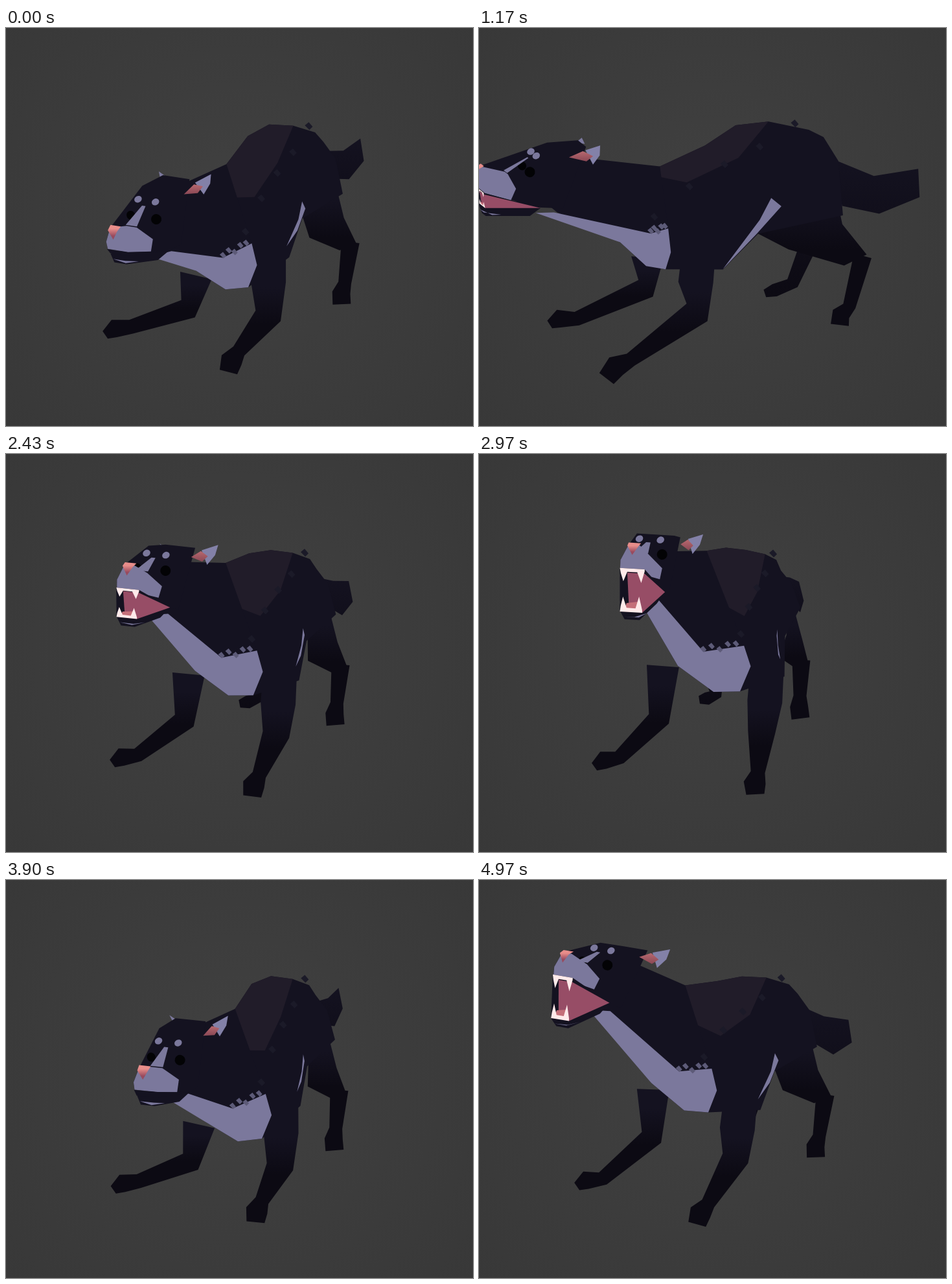
Animation, 721 px wide and 614 px high, one loop 5 s. Source, as an HTML page with a canvas:

```html
<!DOCTYPE html>
<html lang="en">
<head>
<meta charset="utf-8">
<title>Barking dog</title>
<style>
html, body { margin: 0; width: 100%; height: 100%; overflow: hidden; background: #3c3c3c }
canvas { display: block }
</style>
</head>
<body>
<canvas id="stage" width="721" height="614"></canvas>
<script>
const ctx = document.getElementById('stage').getContext('2d');
const LOOP = 5000, BARK = LOOP / 7.5, RAD = Math.PI / 180;
const COAT = '#141220', DARK = '#0c0a13', LILAC = '#7b789c', BLACK = '#030305';
const TILT = .2; // sine of the camera's downward angle

// Time and heading in degrees: 0 faces the camera, 90 is a left profile.
const turn = [[0, 38], [530, 49], [1170, 76], [1400, 76], [1930, 47], [2300, 32], [2900, 16], [3470, 20], [4370, 35], [LOOP, 40]];

// Body points: front view x, y; side view x, y; rise with a bark; half width of a limb.
const body = {
  torso: [
    [366, 200, 285, 232, 50], [384, 158, 350, 186, 12], [411, 148, 396, 150, 0], [442, 154, 447, 144, 0],
    [462, 163, 510, 157, 0], [470, 179, 533, 168, 0], [487, 200, 556, 205, 0], [500, 240, 563, 290, 0],
    [470, 283, 430, 318, 0], [466, 345, 375, 373, 0], [412, 406, 292, 387, 42], [374, 412, 263, 384, 48],
    [325, 385, 225, 352, 62]],
  tint: [[428, 212, 400, 200, 0], [412, 268, 322, 245, 20], [376, 272, 250, 240, 50]],
  tail: [
    [470, 185, 545, 200, -5], [480, 174, 609, 222, -20], [488, 156, 675, 202, -45],
    [495, 186, 677, 246, -45], [490, 214, 615, 275, -35], [478, 215, 560, 270, -15]],
  thigh: [
    [472, 282, 430, 318, 0], [464, 315, 478, 342, 0], [492, 332, 565, 367, 0],
    [514, 325, 600, 350, 0], [503, 288, 562, 303, 0], [485, 220, 540, 200, 0]],
  shank: [[503, 320, 594, 352, 0, 14], [500, 376, 573, 430, 0, 10], [498, 393, 560, 442, 0, 14], [500, 411, 558, 459, 0, 14]],
  foreleg: [
    [438, 340, 337, 350, 0, 26], [438, 390, 334, 395, 8, 27], [436, 444, 337, 444, 15, 21],
    [419, 492, 231, 512, 0, 11], [413, 508, 208, 522, 0, 17], [413, 526, 193, 541, 0, 14]],
  farFore: [
    [305, 385, 268, 375, 60, 25], [290, 442, 262, 414, 36, 17], [213, 467, 150, 448, 0, 11],
    [188, 471, 122, 448, 0, 14], [174, 481, 108, 457, 0, 7]],
  farHind: [[372, 352, 508, 342, 0, 13], [372, 372, 486, 394, 0, 10], [358, 379, 458, 405, 0, 10], [346, 381, 443, 410, 0, 6]],
  bib: [[364, 362, 272, 338, 60], [418, 336, 296, 324, 42], [428, 368, 300, 361, 42]],
  belly: [[460, 320, 375, 373, 0], [460, 295, 433, 296, 0], [460, 270, 451, 262, 0], [460, 280, 467, 275, 0], [460, 310, 428, 318, 0]]
};

// Head points, from between the eyes: forward, up, towards the near side.
const both = list => list.flatMap(([a, b, c]) => [[a, b, c], [a, b, -c]]);
const skull = both([[0, 22, 20], [-35, 40, 30], [-82, 50, 26], [-10, -10, 41], [-25, -52, 32], [-62, -50, 25], [72, -6, 9], [68, -30, 20], [64, -42, 20]]);
const nape = both([[-82, 24, 22], [-55, -58, 20]]);
const jaw = both([[62, -47, 16], [58, -61, 12], [-10, -66, 20], [-25, -53, 30]]);
const muzzle = [...both([[72, -6, 9], [68, -30, 20], [64, -42, 20], [30, -10, 10]]), [25, -46, 34], [20, -27, 34]];
const blaze = [[0, 18, -3], [32, -8, -10], [32, -8, 12], [0, 18, 4]];
const nose = [[70, -2, -10], [70, -2, 10], [78, -9, 9], [76, -23, 0], [78, -9, -9]];
const chin = [[61, -55, -12], [61, -55, 12], [35, -60, 18], [45, -63, 0]];
const ear = [[-78, 47, 40], [-95, 60, 58], [-98, 44, 54], [-92, 27, 46]];
const earPink = [[-55, 32, 36], [-74, 45, 41], [-90, 40, 46], [-82, 30, 42]];
const farEar = [[-80, 45, -30], [-92, 52, -42], [-95, 45, -30]];
const gumTop = [[66, -42, -20], [66, -42, 20]], gumLow = [[60, -47, -18], [60, -47, 18]];
const lipCorner = [-25, -53, 30];

const mix = (a, b, k) => a + (b - a) * k;

function heading(t) {
  const i = turn.findIndex(key => key[0] > t);
  const [a, b] = [turn[i - 1], turn[i]];
  return mix(a[1], b[1], (t - a[0]) / (b[0] - a[0]));
}

function poseAt(t) {
  const deg = heading(t), side = (deg - 20) / 57, yaw = deg * RAD;
  const phase = t / BARK % 1;
  const bark = Math.sin(Math.PI * phase) ** 2.8;
  const gape = 42 * RAD * Math.sin(Math.PI * (phase + .06)) ** 2;
  const pitch = 27 * RAD * bark;
  const eyes = [274 - 195 * side - 28 * bark, mix(292, 146 - 64 * side, bark)];
  const [sy, cy, sp, cp, sg, cg] = [yaw, pitch, gape].flatMap(v => [Math.sin(v), Math.cos(v)]);

  const place = ([xf, yf, xs, ys, rise, width]) =>
    [mix(xf, xs, side) - .4 * rise * bark, mix(yf, ys, side) - rise * bark, width];
  const head = ([a, b, c]) => {
    const fwd = a * cp - b * sp, up = a * sp + b * cp;
    return [eyes[0] - fwd * sy + c * cy, eyes[1] - up * .98 + (fwd * cy + c * sy) * TILT];
  };
  const open = ([a, b, c]) => {
    const [ha, hb] = lipCorner, da = a - ha, db = b - hb;
    return head([ha + da * cg + db * sg, hb - da * sg + db * cg, c]);
  };
  return { place, head, open };
}

// Convex outline of a set of points.
function hull(points) {
  const sorted = [...points].sort((p, q) => p[0] - q[0] || p[1] - q[1]);
  const chain = list => {
    const out = [];
    for (const p of list) {
      while (out.length > 1) {
        const [a, b] = out.slice(-2);
        if ((b[0] - a[0]) * (p[1] - a[1]) > (b[1] - a[1]) * (p[0] - a[0])) break;
        out.pop();
      }
      out.push(p);
    }
    return out.slice(0, -1);
  };
  return [...chain(sorted), ...chain(sorted.reverse())];
}

// Outline of a limb through joints with their half widths.
function limb(joints) {
  const left = [], right = [];
  joints.forEach(([x, y, w], i) => {
    const a = joints[Math.max(0, i - 1)], b = joints[Math.min(joints.length - 1, i + 1)];
    const dx = b[0] - a[0], dy = b[1] - a[1], n = w / Math.hypot(dx, dy);
    left.push([x - dy * n, y + dx * n]);
    right.unshift([x + dy * n, y - dx * n]);
  });
  return [...left, ...right];
}

function poly(points, top, bottom, from = 0, to = 1) {
  ctx.fillStyle = top;
  if (bottom) {
    const ys = points.map(p => p[1]);
    const shade = ctx.createLinearGradient(0, Math.min(...ys), 0, Math.max(...ys));
    shade.addColorStop(from, top);
    shade.addColorStop(to, bottom);
    ctx.fillStyle = shade;
  }
  ctx.beginPath();
  for (const [x, y] of points) ctx.lineTo(x, y);
  ctx.fill();
}

function spot([x, y], rx, ry, color) {
  ctx.beginPath();
  ctx.ellipse(x, y, rx, ry, -.5, 0, 7);
  ctx.fillStyle = color;
  ctx.fill();
}

const fleck = ([x, y], r, color) => poly([[x - r, y - 1], [x, y - r], [x + r, y + 1], [x + 1, y + r]], color);

// Points at a share of the way from a to b, plus a share of the mouth's opening.
const span = (a, b, gap, pairs) => pairs.map(([s, f]) => [0, 1].map(i => mix(a[i], b[i], s) + gap[i] * f));

function drawMouth(head, open) {
  const [u1, u2] = gumTop.map(head), [l1, l2] = gumLow.map(open), corner = head(lipCorner);
  poly([u1, u2, corner, l2, l1], COAT);
  const gap = [l1[0] - u1[0], l1[1] - u1[1]];
  if (gap[1] < 11) return;
  const fangs = [[0, 0], [.04, .12], [.14, .3], [.3, .08], [.7, .08], [.86, .32], [1, .05], [1, 0]];
  poly([...span(u1, u2, gap, [[.3, .1], [1, .1]]), corner, l2, ...span(l1, l2, gap, [[.4, -.2]])], '#974d66');
  poly(span(l1, l2, gap, [[.2, -.06], [.3, -.2], [.85, -.25], [.95, -.06]]), '#c46f79');
  poly(span(u1, u2, gap, fangs), '#ffeaea');
  poly(span(l1, l2, gap, fangs.map(([s, f]) => [s, -f * 1.15])), '#ffeaea');
}

const backdrop = ctx.createRadialGradient(360, 290, 40, 360, 300, 480);
backdrop.addColorStop(0, '#404040');
backdrop.addColorStop(1, '#383838');

function draw(t) {
  const { place, head, open } = poseAt(t);
  const p = {};
  for (const part in body) p[part] = body[part].map(place);
  const [withers, , , , rump] = p.torso, [chestNear, chestLow, throat] = p.torso.slice(-3);
  const [dip, peak, flank] = p.bib;

  ctx.fillStyle = backdrop;
  ctx.fillRect(0, 0, 721, 614);
  poly(limb(p.farHind), '#0f0d17', DARK);
  poly(p.tail, COAT, '#110f1b');
  poly(limb(p.shank), DARK);
  poly(p.thigh, COAT, DARK, .4, .85);
  poly(limb(p.farFore), COAT, DARK, .2, .55);
  poly(p.torso, COAT);
  poly([...p.torso.slice(0, 4), ...p.tint], '#211c29');
  poly(p.belly, LILAC);
  poly(limb(p.foreleg), COAT, DARK, .3, .6);

  poly(hull([...nape.map(head), withers, throat, peak]), COAT);
  for (let i = 0; i < 5; i++)
    fleck([mix(peak[0], rump[0], i / 4 - .1), mix(peak[1], rump[1], i / 4) - 18 + 9 * Math.sin(i * 5)], 6, '#1b1a28');
  poly([head([-30, -68, -10]), head([-52, -60, 14]), dip, peak, flank, chestNear, chestLow, throat], LILAC);
  for (let i = 0; i < 5; i++)
    fleck([mix(dip[0], peak[0], i / 5), mix(dip[1], peak[1], i / 5) - 4 + 4 * Math.sin(i * 4)], 5, '#5d5b78');

  poly(farEar.map(head), LILAC);
  poly(hull(jaw.map(open)), COAT);
  poly(hull(skull.map(head)), COAT);
  poly(ear.map(head), '#8381a8');
  poly(earPink.map(head), '#b8686f', '#8a4855');
  spot(head([0, 0, -25]), 6.5, 7, BLACK);
  for (const c of [-17, 17]) spot(head([-8, 25, c]), 6, 5, LILAC);
  poly(blaze.map(head), LILAC);
  poly(hull(muzzle.map(head)), LILAC);
  poly(chin.map(open), LILAC);
  drawMouth(head, open);
  poly(nose.map(head), '#e88d8a', '#984a5e', .25, .75);
  spot(head([0, 0, 25]), 8, 8, BLACK);
}

function frame() {
  draw(performance.now() % LOOP);
  requestAnimationFrame(frame);
}
frame();
</script>
</body>
</html>
```
